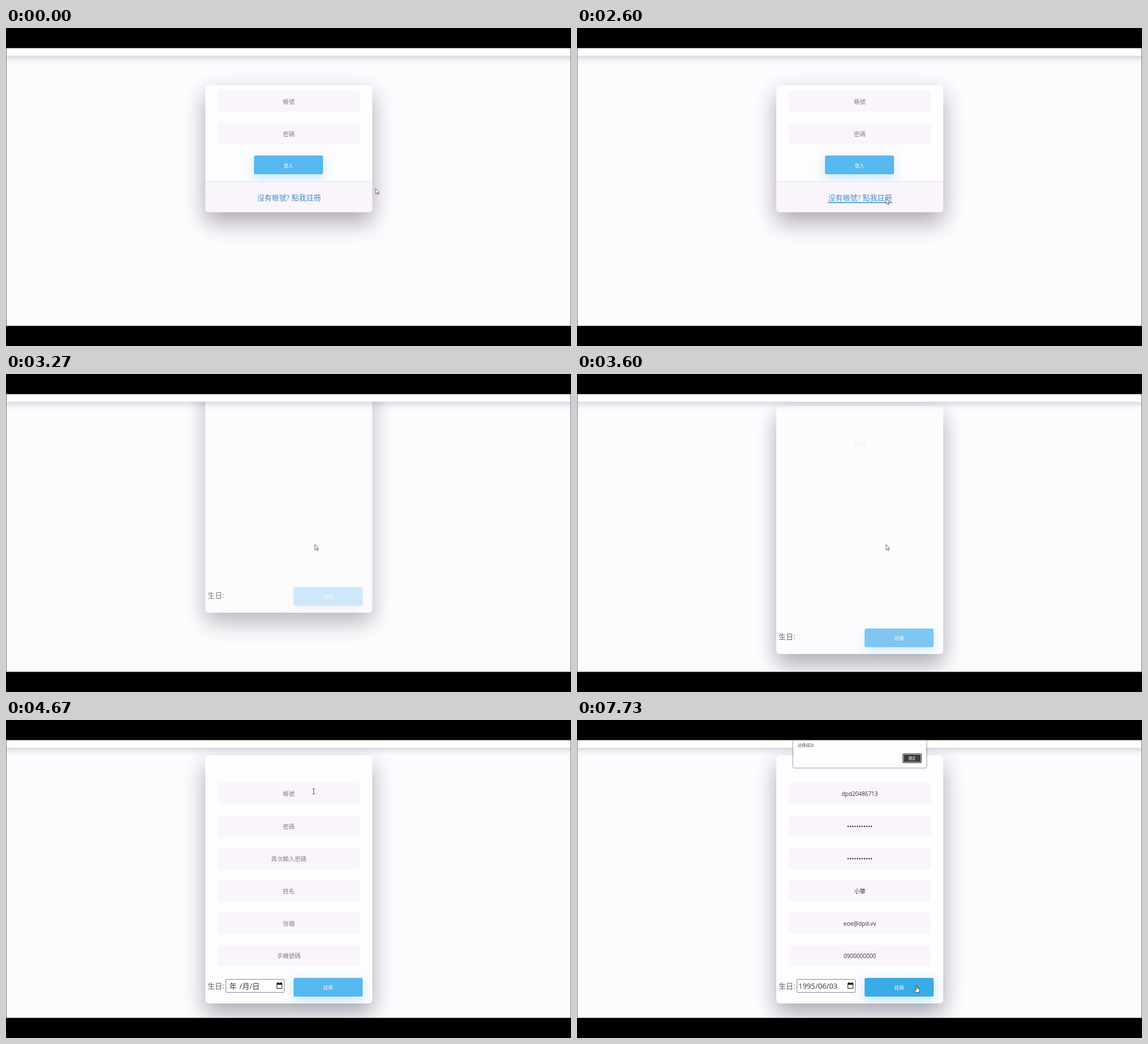
Write an HTML page that moves like this. It is 998 by 561 pixels and loops after 8 s.

```html
<!DOCTYPE html>
<html lang="zh-Hant">
<head>
<meta charset="utf-8">
<style>
html, body { margin: 0; width: 100%; height: 100%; overflow: hidden; background: #000; }
body { font-family: "Open Sans", "Noto Sans CJK TC", "Noto Sans CJK", sans-serif; }
div, svg { position: absolute; box-sizing: border-box; }
div { white-space: pre; }
#stage { left: 0; top: 0; width: 998px; height: 561px; overflow: hidden; background: #000; }
#page { left: 0; top: 35px; width: 998px; height: 491px; overflow: hidden; border: 1px solid #777; background: #fcfbfe; }
#view { left: -1px; top: -36px; width: 998px; height: 561px; }
#nav { left: -20px; top: 0; width: 1038px; height: 49px; background: #fefefe; box-shadow: 0 3px 12px rgba(60, 40, 90, .23); }
.card { left: 352px; width: 295px; border-radius: 6.5px; background: #fdfcfe; box-shadow: 0 20px 39px rgba(0, 0, 0, .27), 0 6px 36px rgba(140, 70, 170, .12); }
#login { top: 101px; height: 224px; }
#signup { top: 62px; height: 438px; }
.mid { display: flex; align-items: center; justify-content: center; }
.field { left: 22px; width: 251px; height: 37px; border-radius: 3px; background: #faf5fc; font-size: 10.4px; color: #808080; }
.field.full { color: #333; font-size: 10px; }
.field.dots { font-size: 11px; }
.button { width: 122px; height: 33px; border-radius: 3.3px; background: #57b7ef; color: #fff; font-size: 8.5px; box-shadow: 0 6.5px 20px rgba(95, 186, 233, .35); }
#foot { left: 0; top: 170px; width: 295px; height: 54px; border-top: 1px solid #dfe4ec; border-radius: 0 0 6.5px 6.5px; background: #faf5fb; }
#link { left: 91px; top: 187px; width: 114px; height: 20px; color: #468fc9; font-size: 13px; }
#line { left: 91px; top: 206px; height: 1.6px; background: #56a9dc; }
#birth { left: 4px; top: 397px; height: 20px; line-height: 20px; font-size: 13px; color: #666; }
#date { left: 36px; top: 395px; width: 104px; height: 24px; border: 1px solid #888; border-radius: 1.5px; background: #fff; font-size: 13px; color: #333; }
#year { left: 1px; top: 1px; height: 20px; padding: 0 1px; line-height: 20px; }
#rest { top: 1px; height: 20px; line-height: 20px; }
#alert { left: 382px; top: 20px; width: 235px; height: 64px; border-radius: 2px; background: #fefefe; box-shadow: 0 0 2px 1px rgba(70, 60, 90, .5); }
#alert .msg { left: 8px; top: 20px; font-size: 7px; line-height: 10px; color: #444; }
#alert .ok { left: 193px; top: 39px; width: 34px; height: 17px; border-radius: 2px; background: #3b3d42; border: 1px solid #333; box-shadow: inset 0 0 0 1px #ddd; color: #fff; font-size: 6.3px; }
#mouse { left: 0; top: 0; width: 16px; height: 18px; overflow: visible; }
</style>
</head>
<body>
<div id="stage">
  <div id="page"><div id="view">
    <div id="login" class="card">
      <div class="field mid" style="top:10px">帳號</div>
      <div class="field mid" style="top:67px">密碼</div>
      <div class="button mid" style="left:86px;top:124px">登入</div>
      <div id="foot"></div>
      <div id="link" class="mid">沒有帳號? 點我註冊</div>
      <div id="line"></div>
    </div>
    <div id="signup" class="card">
      <div id="birth">生日:</div>
      <div id="date">
        <div id="year"></div><div id="rest"></div>
        <svg style="left:88px;top:4px" width="12" height="13">
          <path d="M1.5 2.5H10.5V11.5H1.5Z" fill="none" stroke="#111"/>
          <path d="M1 2H11V5H1ZM2.5 .5H4V3H2.5ZM8 .5H9.5V3H8Z" fill="#111"/>
        </svg>
      </div>
      <div id="send" class="button mid" style="left:156px;top:392.5px">註冊</div>
    </div>
    <div id="nav"></div>
    <div id="alert"><div class="msg">註冊成功</div><div class="ok mid">確定</div></div>
  </div></div>
  <svg id="mouse">
    <path id="arrow" d="M0 0V9.6L2.2 7.6L3.7 11L5.2 10.3L3.7 7.1H6.6Z" fill="#fff" stroke="#444" stroke-width=".8"/>
    <path id="beam" d="M-2 -4.5H2M0 -4.5V4.5M-2 4.5H2" fill="none" stroke="#555"/>
    <path id="hand" d="M-1 .8Q0 -.6 1 .8V5L5 6Q5.6 6.4 5.4 8L4.4 13H-1.4L-4 8.6Q-4 7 -2.6 7.6L-1 9Z" fill="#fff" stroke="#222" stroke-width=".9"/>
  </svg>
</div>
<script>
const LOOP = 8000, OPEN = 2740, TYPE = 5000, PRESS = 6270, ALERT = 7470;
const $ = id => document.getElementById(id);
const clamp = x => Math.min(1, Math.max(0, x));
const span = (t, a, b) => clamp((t - a) / (b - a));
const show = (el, on) => el.style.display = on ? "" : "none";

// CSS-style cubic timing curve, solved by bisection
function curve(x1, y1, x2, y2) {
  const at = (a, b, s) => 3 * a * s * (1 - s) ** 2 + 3 * b * s * s * (1 - s) + s ** 3;
  return x => {
    let lo = 0, hi = 1;
    for (let i = 0; i < 24; i++) {
      const m = (lo + hi) / 2;
      at(x1, x2, m) < x ? lo = m : hi = m;
    }
    return at(y1, y2, lo);
  };
}
const ease = curve(.25, .1, .25, 1), easeIn = curve(.42, 0, 1, 1), glide = curve(.42, 0, .58, 1);

const rows = [
  ["帳號", "dpd20486713"],
  ["密碼", "•".repeat(11)],
  ["再次輸入密碼", "•".repeat(11)],
  ["姓名", "小華"],
  ["信箱", "eoe@dpd.vv"],
  ["手機號碼", "0900000000"]
].map(([hint, value], i) => {
  const el = document.createElement("div");
  el.style.top = 49.3 + i * 57.2 + "px";
  $("signup").append(el);
  return { el, hint, value, dots: value[0] === "•" };
});

// Each leg: start, end, target x, target y
const legs = [[2060, 2200, 545.8, 300.8], [4130, 4650, 543.5, 126], [5700, 6070, 600, 468]];

function mouseAt(t) {
  let x = 653, y = 283;
  for (const [a, b, tx, ty] of legs) {
    const k = glide(span(t, a, b));
    x += (tx - x) * k;
    y += (ty - y) * k;
  }
  return [x, y];
}

function drawForm(t) {
  const slide = ease(span(t, OPEN + 13, OPEN + 1013));
  $("signup").style.transform = `translateY(${(slide - 1) * 438}px)`;
  $("signup").style.opacity = slide;
  const fade = delay => easeIn(span(t, OPEN + delay, OPEN + delay + 1000));
  rows.forEach((r, i) => {
    const k = span(t, TYPE + i * 95, TYPE + i * 95 + 90);
    const typed = r.value.slice(0, Math.ceil(k * r.value.length));
    r.el.textContent = typed || r.hint;
    r.el.className = "field mid" + (typed ? " full" : "") + (typed && r.dots ? " dots" : "");
    r.el.style.opacity = fade(i ? 800 : 600);
  });
  $("date").style.opacity = fade(800);
  $("send").style.opacity = fade(13);

  const dated = t >= TYPE + 600, picked = dated && t < PRESS;
  $("year").textContent = dated ? "1995" : " 年 ";
  $("year").style.background = picked ? "#0878d4" : "none";
  $("year").style.color = picked ? "#fff" : "";
  $("rest").textContent = dated ? "/06/03" : "/月/日";
  $("rest").style.left = dated ? "32px" : "23.5px";
}

function drawMouse(t) {
  const [x, y] = mouseAt(t);
  const onForm = t >= OPEN + 1000;
  const onButton = onForm && x > 508 && x < 630 && y > 454 && y < 487;
  const row = (y - 111.3) / 57.2;
  const onField = onForm && row >= 0 && row < 6 && row % 1 < .65;
  $("mouse").style.transform = `translate(${x}px,${y}px)`;
  show($("hand"), onButton);
  show($("beam"), onField);
  show($("arrow"), !onButton && !onField);
  $("send").style.backgroundColor = onButton ? "#39ace7" : "";
}

function draw(t) {
  show($("login"), t < OPEN);
  show($("signup"), t >= OPEN);
  show($("alert"), t >= ALERT);
  $("line").style.width = 114 * ease(span(t, 2080, 2220)) + "px";
  drawForm(t);
  drawMouse(t);
}

const begin = performance.now();
function tick() {
  draw((performance.now() - begin) % LOOP);
  requestAnimationFrame(tick);
}
tick();
</script>
</body>
</html>
```
